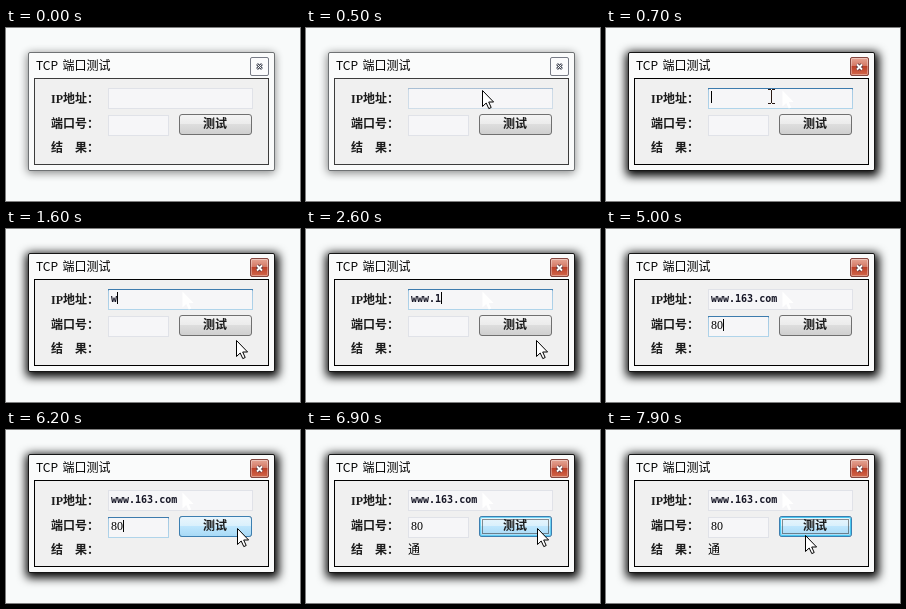
An HTML page that plays this animation: 294 px wide and 173 px high, repeating every 8 s.

```html
<!DOCTYPE html>
<html lang="zh">
<head>
<meta charset="utf-8">
<title>TCP 端口测试</title>
<style>
  html, body { margin: 0; width: 100%; height: 100%; overflow: hidden; background: #f8fafa; }
  svg { display: block; width: 100vw; height: 100vh; }
  text { fill: #000; white-space: pre; }
  .title { font: 12px "Noto Sans CJK SC", "Noto Sans CJK", sans-serif; }
  .label { font: 700 12px "Noto Sans CJK SC", "Noto Sans CJK", sans-serif; fill: #1c1c1c; }
  .latin { font-family: "Liberation Serif", serif; }
  .input { font: 700 10px "DejaVu Sans Mono", monospace; fill: #151525; }
  .digits { font: 12px "Liberation Serif", serif; }
  .result { font: 500 12px "Noto Sans CJK SC", "Noto Sans CJK", sans-serif; }
</style>
</head>
<body>
<svg viewBox="0 0 294 173">
  <defs>
    <filter id="soft" x="-20%" y="-20%" width="140%" height="140%"><feGaussianBlur stdDeviation="4"/></filter>
    <filter id="deep" x="-20%" y="-25%" width="140%" height="150%"><feGaussianBlur stdDeviation="5"/></filter>
    <linearGradient id="plain" x2="0" y2="1">
      <stop offset="0" stop-color="#f4f4f4"/><stop offset=".48" stop-color="#ebebeb"/>
      <stop offset=".5" stop-color="#dddddd"/><stop offset="1" stop-color="#cfcfcf"/>
    </linearGradient>
    <linearGradient id="hot" x2="0" y2="1">
      <stop offset="0" stop-color="#eaf6fd"/><stop offset=".48" stop-color="#d9f0fc"/>
      <stop offset=".5" stop-color="#bee6fd"/><stop offset="1" stop-color="#a7d9f5"/>
    </linearGradient>
    <linearGradient id="down" x2="0" y2="1">
      <stop offset="0" stop-color="#d5eaf6"/><stop offset=".5" stop-color="#98d1ef"/><stop offset="1" stop-color="#68b3db"/>
    </linearGradient>
    <linearGradient id="red" x2="0" y2="1">
      <stop offset="0" stop-color="#e6a797"/><stop offset=".48" stop-color="#d47763"/>
      <stop offset=".5" stop-color="#bd3f28"/><stop offset="1" stop-color="#d2694c"/>
    </linearGradient>
    <linearGradient id="edge" x2="0" y2="1">
      <stop offset=".03" stop-color="#3d7bad"/><stop offset=".06" stop-color="#a4c9e3"/><stop offset="1" stop-color="#b0d4ea"/>
    </linearGradient>
    <path id="arrow" d="M.5 .5V16.5L4.2 13L6.8 18.6L9.2 17.5L6.7 12H11.6Z"/>
  </defs>

  <rect width="294" height="173" fill="#f8fafa"/>
  <rect id="shadowIdle" x="21" y="25" width="248" height="120" rx="4" opacity=".45" filter="url(#soft)"/>
  <rect id="shadowLive" x="20" y="24" width="253" height="124" rx="4" filter="url(#deep)"/>
  <rect id="frame" x="22.5" y="24.5" width="246" height="118" rx="1.5" fill="#fafbfb"/>
  <rect id="client" x="28.5" y="50.5" width="234" height="86" fill="#f0f0f0"/>

  <text class="title" x="30" y="42">TCP</text>
  <text class="title" x="56.5" y="42">端口测试</text>

  <g id="closeIdle">
    <rect x="244.5" y="29.5" width="18" height="18" rx="1.5" fill="#fbfbfc" stroke="#777b86"/>
    <path d="M251 36l5 5m0-5l-5 5" stroke="#4b4f5c" stroke-width="2.6"/>
    <path d="M251.4 36.4l4.2 4.2m0-4.2l-4.2 4.2" stroke="#fff"/>
  </g>
  <g id="closeLive">
    <rect x="244.5" y="29.5" width="18" height="18" rx="1.5" fill="url(#red)" stroke="#84463f"/>
    <rect x="245.5" y="30.5" width="16" height="16" rx="1" fill="none" stroke="#fff" opacity=".35"/>
    <path d="M251 36.5l5 5m0-5l-5 5" stroke="#5a3a40" stroke-width="3.6"/>
    <path d="M251 36.5l5 5m0-5l-5 5" stroke="#fff" stroke-width="1.8"/>
  </g>

  <text class="label" x="45" y="75"><tspan class="latin">IP</tspan></text>
  <text class="label" x="57" y="75">地址：</text>
  <text class="label" x="45" y="100">端口号：</text>
  <text class="label" x="45" y="124">结　果：</text>

  <g fill="#f6f6f8" stroke="#e0e2e8">
    <rect x="102.5" y="60.5" width="144" height="20"/>
    <rect x="102.5" y="87.5" width="60" height="20"/>
  </g>
  <g fill="none" stroke="url(#edge)">
    <rect id="hostFocus" x="102.5" y="60.5" width="144" height="20"/>
    <rect id="portFocus" x="102.5" y="87.5" width="60" height="20"/>
  </g>
  <use id="trace" href="#arrow" x="176" y="62" fill="#fff"/>
  <text id="host" class="input" x="105" y="73"></text>
  <text id="port" class="digits" x="105" y="100"></text>
  <rect id="caret" width="1" height="12"/>

  <rect x="173.5" y="86.5" width="72" height="20" rx="2.5" fill="url(#plain)" stroke="#707070"/>
  <rect id="hover" x="173.5" y="86.5" width="72" height="20" rx="2.5" fill="url(#hot)" stroke="#3c7fb1"/>
  <rect id="ring" x="174.5" y="87.5" width="70" height="18" rx="1.5" fill="none" stroke="#48c8f0"/>
  <rect id="press" x="173.5" y="86.5" width="72" height="20" rx="2.5" fill="url(#down)" stroke="#2c628b"/>
  <rect id="dots" x="176.5" y="89.5" width="66" height="14" fill="none" stroke="#222" stroke-dasharray="1"/>
  <text class="label" x="197" y="100">测试</text>
  <text id="result" class="result" x="102" y="124">通</text>

  <path id="beam" d="M162 61.5h3m1 0h3M165.5 62v13M162 75.5h3m1 0h3" fill="none" stroke="#2a1a14"/>
  <use id="pointer" href="#arrow" fill="#fff" stroke="#000"/>
</svg>
<script>
  const LOOP = 8000, STEP = 100;
  const HOST = "www.163.com", PORT = "80";
  const hostKeys = [1600, 1800, 2000, 2400, 2600, 2800, 3000, 3200, 3400, 3600, 3700];
  const portKeys = [4800, 5000];
  // Pointer path: time, x, y
  const path = [
    [100, 284, 84], [500, 176, 62], [900, 167, 66], [1300, 230, 111],
    [5800, 230, 111], [6200, 231, 98], [7700, 231, 98], [7900, 199, 105]
  ];
  const pointerOn = [[100, 600], [900, 1800], [2500, 2800], [3500, 3700], [4200, 4800], [5400, LOOP]];
  const caretOn = [[600, 1100], [1600, 4200], [4400, 5500], [6000, 6500]];

  const el = {};
  document.querySelectorAll("svg [id]").forEach(n => el[n.id] = n);

  const set = (name, attrs) => {
    for (const key in attrs) el[name].setAttribute(key, attrs[key]);
  };
  const fade = (name, v) => set(name, { opacity: v });
  const show = (name, on) => set(name, { visibility: on ? "visible" : "hidden" });
  const ramp = (t, a, b) => Math.min(1, Math.max(0, (t - a) / (b - a)));
  const within = (t, spans) => spans.some(([a, b]) => t >= a && t < b);
  const typed = (t, keys) => keys.filter(k => t >= k).length;

  function position(t) {
    let i = 0;
    while (i < path.length - 2 && t >= path[i + 1][0]) i++;
    const [t0, x0, y0] = path[i], [t1, x1, y1] = path[i + 1];
    const k = ramp(t, t0, t1);
    return [Math.round(x0 + (x1 - x0) * k), Math.round(y0 + (y1 - y0) * k)];
  }

  function draw(t) {
    const live = t >= 600;
    show("shadowIdle", !live);
    show("shadowLive", live);
    show("closeIdle", !live);
    show("closeLive", live);
    show("trace", live);
    set("frame", { stroke: live ? "#151515" : "#6f7274" });
    set("client", { stroke: live ? "#000" : "#3c3c3c" });

    fade("hostFocus", ramp(t, 400, 700) * (1 - ramp(t, 4300, 4600)));
    fade("portFocus", ramp(t, 4300, 4600) * (1 - ramp(t, 6500, 6900)));

    const h = typed(t, hostKeys), p = typed(t, portKeys);
    el.host.textContent = HOST.slice(0, h);
    el.port.textContent = PORT.slice(0, p);
    const inPort = t >= 4400;
    set("caret", { x: 105 + 6 * (inPort ? p : h), y: inPort ? 90 : 63 });
    show("caret", within(t, caretOn));

    fade("hover", ramp(t, 5900, 6200));
    fade("ring", ramp(t, 6600, 7000));
    show("press", within(t, [[6500, 6700]]));
    show("dots", t >= 6500);
    show("result", t >= 6900);

    const [x, y] = position(t);
    set("pointer", { x, y });
    show("pointer", within(t, pointerOn));
    show("beam", within(t, [[600, 900]]));
  }

  function tick(now) {
    draw(Math.floor((now % LOOP) / STEP) * STEP);
    requestAnimationFrame(tick);
  }
  draw(0);
  requestAnimationFrame(tick);
</script>
</body>
</html>
```
